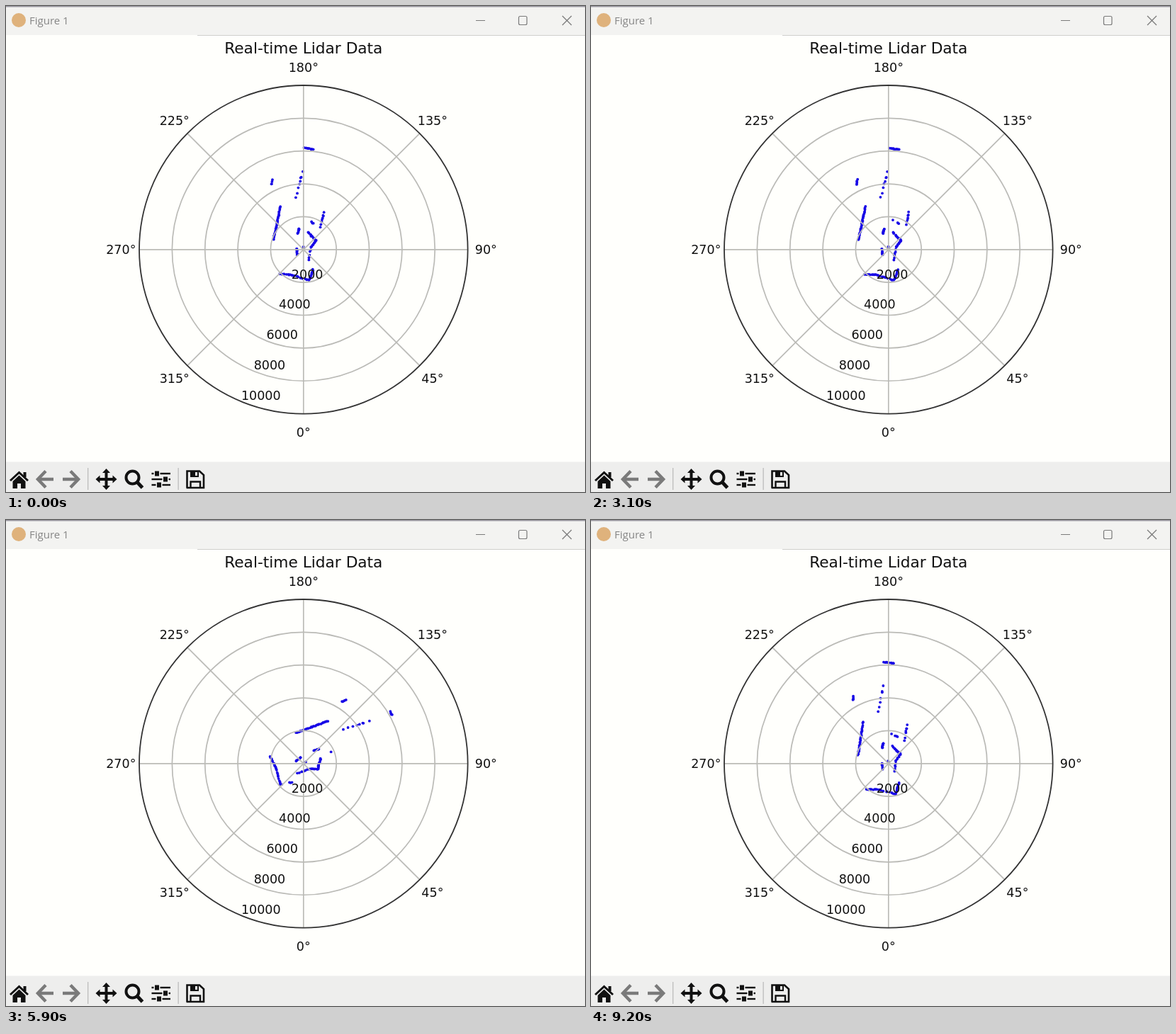
An HTML page with a canvas that plays this animation: 817x686 px, repeating every 9.3 s.

```html
<!DOCTYPE html>
<html>
<head>
<meta charset="utf-8">
<title>Figure 1</title>
<style>
  html, body { margin: 0; width: 100%; height: 100%; overflow: hidden; background: #fffffc; }
  canvas { display: block; }
</style>
</head>
<body>
<canvas id="stage" width="817" height="686"></canvas>
<script>
const ctx = document.getElementById('stage').getContext('2d');
const LOOP = 9300, STEP = 100;
const CX = 419.8, CY = 343.8, R = 231.8;
const INK = '#111', PAPER = '#fffffc', BAR = '#eeeeed', GRAY = '#7a7a7a';
const SANS = 'px "DejaVu Sans", sans-serif', TICK = 17.5 + SANS;

function ease(t, from, to) {
  const k = Math.min(1, Math.max(0, (t - from) / (to - from)));
  return k * k * (3 - 2 * k);
}

// Repeatable random number from 0 to 1.
function noise(a, b) {
  const v = Math.sin(a * 12.9898 + b * 78.233) * 43758.5453;
  return v - Math.floor(v);
}

function line(points, width, color) {
  ctx.beginPath();
  points.forEach(([x, y]) => ctx.lineTo(x, y));
  ctx.lineWidth = width;
  ctx.strokeStyle = color;
  ctx.stroke();
}

function shape(points, color) {
  ctx.beginPath();
  points.forEach(([x, y]) => ctx.lineTo(x, y));
  ctx.fillStyle = color;
  ctx.fill();
}

function rect(x, y, w, h, color) {
  ctx.fillStyle = color;
  ctx.fillRect(x, y, w, h);
}

function ring(x, y, r, width, color) {
  ctx.beginPath();
  ctx.arc(x, y, r, 0, Math.PI * 2);
  ctx.lineWidth = width;
  ctx.strokeStyle = color;
  ctx.stroke();
}

function disc(x, y, r, color) {
  ctx.beginPath();
  ctx.arc(x, y, r, 0, Math.PI * 2);
  ctx.fillStyle = color;
  ctx.fill();
}

function label(text, x, y, font, align = 'center', color = INK) {
  ctx.font = font;
  ctx.textAlign = align;
  ctx.fillStyle = color;
  ctx.fillText(text, x, y);
}

// Readings scattered along a bent surface seen from the sensor.
function surface(count, ...corners) {
  const spans = corners.length - 1;
  return Array.from({ length: count }, (_, i) => {
    const t = (i + noise(i, count)) / count * spans;
    const [x1, y1] = corners[Math.floor(t)], [x2, y2] = corners[Math.floor(t) + 1];
    return [x1 + (x2 - x1) * (t % 1), y1 + (y2 - y1) * (t % 1)];
  });
}

const room = [
  surface(10, [0, -143.5], [16, -141]),
  surface(8, [-1, -112], [-11, -73]),
  surface(5, [-44, -99], [-45.5, -91]),
  surface(30, [-32.5, -61], [-42.5, -13]),
  surface(8, [29, -54], [24, -31]),
  surface(4, [6, -42], [17, -35]),
  surface(9, [-6, -30], [-8, -22]),
  surface(9, [-9.5, -2], [-8.5, 8]),
  surface(3, [0, 0], [0, -5]),
  surface(32, [6, -25], [13, -17], [18, -13], [11, -4], [7, 15]),
  surface(34, [-34.5, 34.5], [-16, 36], [8, 43.5], [13.5, 28])
].flat();

// Clockwise heading in degrees: a left turn and back, then a right turn and back.
function heading(step) {
  return -61 * (ease(step, 9, 18) - ease(step, 21, 30))
    + 88 * ease(step, 39, 50) - 116 * ease(step, 55, 67) + 25 * ease(step, 70, 77);
}

// The right turn shades the right side of the room, the turn back its left side.
function shadedSide(step) {
  return step > 46 && step < 79 ? Math.sign(62.5 - step) : 0;
}

function drawScan(step) {
  const turn = heading(step) * Math.PI / 180;
  const cos = Math.cos(turn), sin = Math.sin(turn), side = shadedSide(step);
  room.forEach(([px, py], id) => {
    const shaded = px * side > 9 && Math.hypot(px, py) > 35;
    if (shaded || noise(id, step + 3) < 0.06) return;
    const x = px + noise(id, step) - 0.5, y = py + noise(step, id) - 0.5;
    disc(CX + x * cos - y * sin, CY + x * sin + y * cos, 1.9, '#1808e6');
  });
}

function drawGrid() {
  const grid = '#bbbbb7';
  for (let a = 0; a < 8; a++) {
    const t = a * Math.PI / 4, x = Math.sin(t), y = Math.cos(t);
    line([[CX, CY], [CX + R * x, CY + R * y]], 1.7, grid);
    label(a * 45 + '°', CX + 257.5 * x, CY + 257.5 * y + 6.3, TICK);
  }
  for (let k = 1; k < 5; k++) ring(CX, CY, R * k / 5, 1.7, grid);
  ring(CX, CY, R, 1.8, '#333');
}

function drawLabels() {
  label('Real-time Lidar Data', CX, 66.5, 21.7 + SANS);
  const slant = Math.PI / 8;
  for (let k = 1; k <= 5; k++) {
    const r = R * k / 5;
    label(k * 2000, CX + 0.8 - r * Math.sin(slant), CY + r * Math.cos(slant) - 2, TICK, 'left');
  }
}

function drawTitleBar() {
  rect(0, 0, 817, 41, '#f3f3f1');
  rect(0, 0, 817, 1.5, '#9a97a0');
  rect(270, 41, 547, 1, '#cfcfcd');
  disc(18, 20, 10, '#dfb27c');
  label('Figure 1', 33, 26, '15px "Open Sans", sans-serif', 'left', '#858585');
  line([[663, 20.5], [676, 20.5]], 1, GRAY);
  ctx.beginPath();
  ctx.roundRect(723.5, 14.5, 11.5, 12, 2);
  ctx.lineWidth = 1.2;
  ctx.stroke();
  line([[785, 14], [798, 27]], 1.2, GRAY);
  line([[798, 14], [785, 27]], 1.2, GRAY);
}

function drawHome() {
  line([[6, 670], [18.5, 658.5], [31, 670]], 3, INK);
  rect(24.5, 658, 4, 7, INK);
  shape([[9.5, 671], [18.5, 662.5], [27.5, 671], [27.5, 681], [9.5, 681]], INK);
  rect(16, 674, 5, 7, BAR);
}

function drawArrow(x, dir) {
  line([[x - dir * 12, 668], [x + dir * 9, 668]], 4.5, GRAY);
  line([[x - dir, 656.5], [x + dir * 10, 668], [x - dir, 679.5]], 4.5, GRAY);
}

function drawMove() {
  ctx.save();
  ctx.translate(141.5, 668);
  for (let i = 0; i < 4; i++) {
    rect(-2, -10, 4, 11, INK);
    shape([[0, -15], [5.5, -9], [-5.5, -9]], INK);
    ctx.rotate(Math.PI / 2);
  }
  ctx.restore();
}

function drawZoom() {
  ring(178.5, 665.5, 9, 4, INK);
  line([[185, 672], [192.5, 680]], 5, INK);
}

function drawSliders() {
  [213, 225, 216].forEach((knob, i) => {
    const y = 660 + i * 8;
    rect(205.5, y - 1.2, 26.5, 2.4, INK);
    rect(knob - 4.5, y - 3.5, 9, 7, BAR);
    rect(knob - 3, y - 3.5, 6, 7, INK);
  });
}

function drawSave() {
  line([[255.5, 680], [255.5, 656.5], [273, 656.5], [279, 662], [279, 680], [254.5, 680]], 2.6, INK);
  rect(260, 656, 12, 9, INK);
  rect(267, 658, 3, 5, BAR);
  line([[260.5, 680], [260.5, 671.5], [274, 671.5], [274, 680]], 2.4, INK);
}

function drawToolbar() {
  rect(0, 643.5, 817, 42.5, BAR);
  drawHome();
  drawArrow(55, -1);
  drawArrow(92, 1);
  rect(115, 652, 1.3, 31, '#bcbcbc');
  drawMove();
  drawZoom();
  drawSliders();
  rect(242.5, 652, 1.3, 31, '#bcbcbc');
  drawSave();
}

function render() {
  const step = Math.floor((performance.now() - start) % LOOP / STEP);
  rect(0, 0, 817, 686, PAPER);
  drawScan(step);
  drawGrid();
  drawLabels();
  drawTitleBar();
  drawToolbar();
  requestAnimationFrame(render);
}

const start = performance.now();
render();
</script>
</body>
</html>
```
